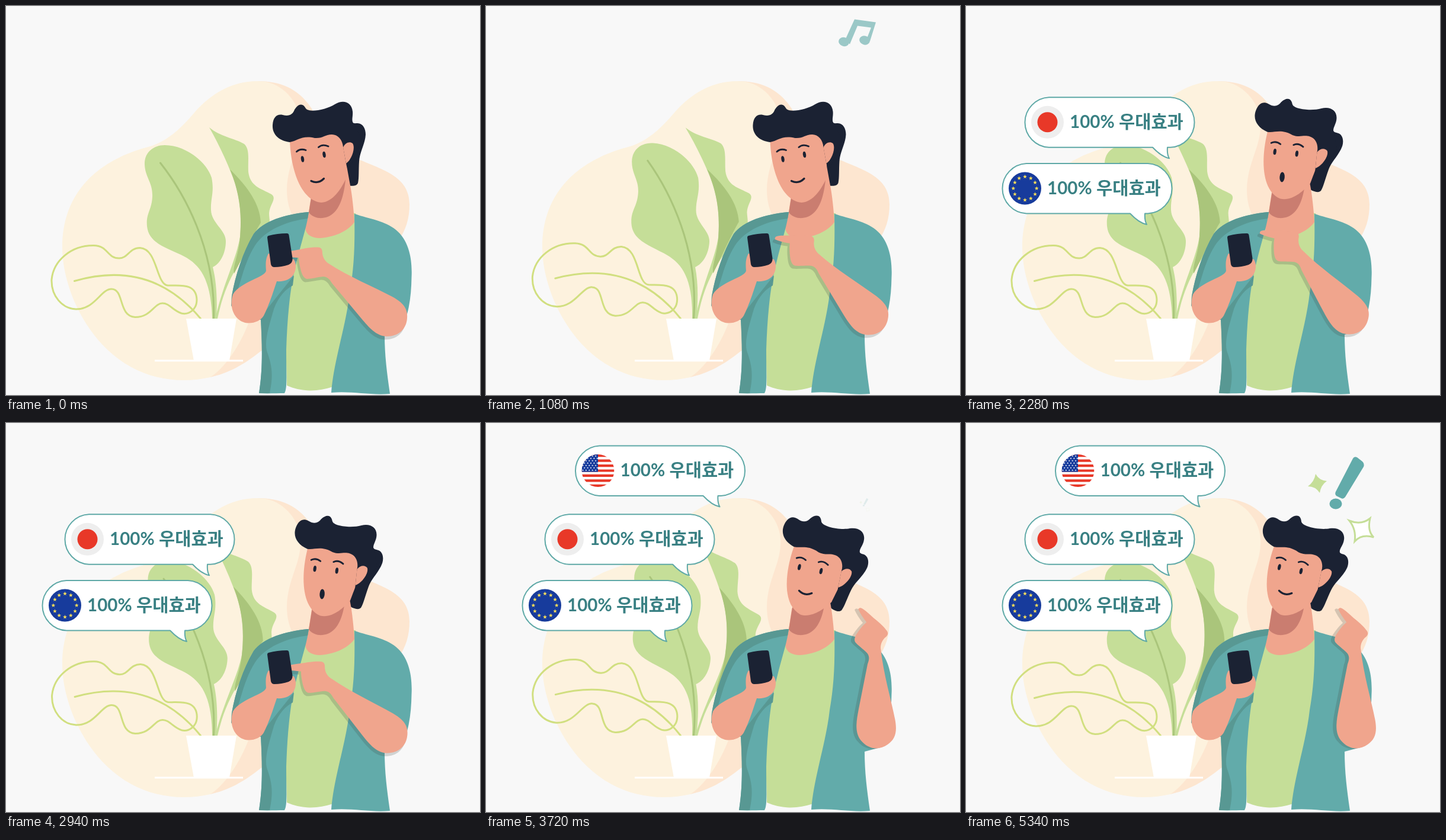
Recreate the animation shown at these times as an HTML page. Size 800 px wide and 657 px high, loop 5400 ms.

```html
<!DOCTYPE html>
<html lang="ko">
<head>
<meta charset="utf-8">
<title>우대효과</title>
<style>
  html, body { margin: 0; width: 100%; height: 100%; overflow: hidden; background: #f8f8f8; }
  svg { display: block; width: 100%; height: 100%; }
  text { font: 700 29.6px Lato, "Noto Sans CJK KR", "Noto Sans CJK JP", "Noto Sans CJK", sans-serif; fill: #398083; }
  .teal { fill: #62abaa; }
  .shade { fill: #589893; }
  .skin { fill: #f0a58d; }
  .ink { fill: #1b2233; }
  .leaf { fill: #c5de98; }
  .deep { fill: #aac57b; }
  .line { fill: none; stroke-linecap: round; stroke-linejoin: round; }
</style>
</head>
<body>
<svg viewBox="0 0 800 657">
  <defs>
    <path id="limb" d="M468 419C470 415 480 414 497 411C510 408 520 407 527 407.5C533 408 534 412 534 418C535 425 538 430 543 434C580 458 620 474 652 491C672 502 678 512 677 527C676 546 662 558 643 558C625 558 612 542 600 528L550 468C546 461 542 457 535 457C525 458 515 461 508 461C502 460 499 452 497 444C495 436 494 430 494 425C485 425 475 424 468 422Z"/>
    <clipPath id="disc"><circle cx="99.5" cy="308" r="27.5"/></clipPath>
    <g id="balloon">
      <path d="M102 266H307A42.6 42.3 0 0 1 307 350.5H302C301.5 357 302 364 305 369C295 367 285 359 277 350.5H102A42.6 42.3 0 0 1 102 266Z" fill="#fff" stroke="#5fa9a7" stroke-width="2" stroke-linejoin="round"/>
      <text x="137" y="317.5">100% 우대효과</text>
    </g>
  </defs>

  <path d="M422 127C470 126 500 145 520 180C540 225 560 247 600 261C640 278 681 290 681 335C681 385 655 410 610 450C550 505 480 550 430 583C400 607 375 620 345 627L300 500Z" fill="#fde6d0"/>
  <path d="M422 127C385 127 347 146 318 180C290 213 268 230 240 238C190 251 95 290 95 408C95 490 160 632 300 632C316 632 331 630 345 627C375 607 400 563 412 528C440 460 520 420 510 385C488 368 474 345 474 310C475 265 496 240 497 205C500 172 475 135 437 127.5Z" fill="#fdf2de"/>

  <g id="rightLeaf">
    <path class="leaf" d="M343 205C362 221 385 223 402 233C412 242 408 260 409 280C412 305 430 308 448 318C458 325 445 335 444 350C444 362 450 375 432 390C395 425 370 465 357 528H353C368 465 388 430 395 390C399 345 392 310 380 282C368 252 356 228 343 205Z"/>
    <path class="deep" d="M378 276C408 305 429 335 430 366C418 385 402 420 385 452C382 440 393 420 395 390C399 345 392 310 378 276Z"/>
  </g>
  <g id="leftLeaf">
    <path class="leaf" d="M349 441C362 435 371 417 371 397C371 378 347 367 346 345C345 325 352 315 347 290C338 262 302 235 268 235C248 235 233 248 234 268C235 290 248 298 247 322C246 345 236 350 238 372C241 400 268 407 295 420C327 435 346 460 348 528H355C357 495 355 465 349 441Z"/>
    <path class="line" d="M260.5 265C300 315 354 410 350.5 528" stroke="#aac57b" stroke-width="3"/>
  </g>
  <g id="wireLeaf" class="line" stroke="#d1df80" stroke-width="3">
    <path d="M77 462C80 430 110 404 148 404.5C173 405 170 426 191 426C206 426 208 408.5 226 408.5C256 410 253 470 273 472C290 473 321 466 322 496C322 514 307 522 296 519C281 514 276 502 264 502C250 502 245 525.5 218 525.5C189 524 200 478 178 478C160 478 150 512.5 118 512C95 511 76 490 77 462Z"/>
    <path d="M115.5 464.5C200 440 272 460 328.5 528"/>
  </g>
  <path d="M304 528H389L377 599H317Z" fill="#fff"/>
  <path d="M251 599H400" stroke="#fff" stroke-width="3"/>

  <g id="note" class="teal">
    <path d="M622 101L658 106L648 138H641L650 115L627 112L614 143L606 136Z"/>
    <ellipse cx="604" cy="139" rx="9" ry="7.5" transform="rotate(18 604 139)"/>
    <ellipse cx="639" cy="136.5" rx="9" ry="7.5" transform="rotate(18 639 136.5)"/>
  </g>
  <g id="alert">
    <path class="teal" d="M653 60Q655 56 660 58L669 65Q673 69 671 74L640 125Q637 129 633 127L625 123Q622 120 624 116Z"/>
    <ellipse class="teal" cx="624" cy="136.5" rx="10.5" ry="9"/>
    <path class="leaf" d="M590 86Q596 97 609 98Q599 105 597 118Q590 107 577 107Q588 99 590 86Z"/>
    <path d="M682 161Q677 182 688 193Q668 187 656 200Q659 180 647 165Q667 173 682 161Z" fill="#fff" stroke="#c5de98" stroke-width="3"/>
  </g>

  <g id="backHead"><path class="ink" d="M560 200L584 192C584 198 587 198.5 592 198C602 197 607 207 607 217C606 234 597 246 596 262C595 278 596 290 594 299C592 304 586 304 580 303.5C568 303 562 285 566 265Z"/></g>

  <path class="leaf" d="M511 348L590 350L600 420L568 640L552 643C525 652 500 652 474 641L470 480Z"/>
  <path class="skin" d="M516 315L511 348L505 372C505 383 511 391 529 392C552 391 577 381 588 365C587 345 584 318 581 303L575 270H530Z"/>
  <path d="M517 312L511 349C520 359 532 360 543 356C561 349 570 325 573 293Z" fill="#ca7d70"/>
  <path class="teal" d="M588 351C615 360 640 363 658 378C680 396 686 427 684.5 458C684 490 680 525 665 548L639 555C639 590 643 620 648 655C615 658 585 650 549 653C553 600 574 540 580 485C588 440 589 400 588 351Z"/>
  <path class="teal" d="M511 348C470 352 435 363 418 385C400 415 387 455 381 490C378 515 395 530 430 530C432 570 434 610 427 654C440 655 457 654 470 654C475 645 473 625 473 580C475 520 480 470 491 430C498 400 508 372 511 348Z"/>
  <path class="shade" d="M511 348C470 352 435 363 418 385C400 415 387 455 381 490L380 508C395 480 398 440 420 405C437 378 475 363 509 359Z"/>
  <path class="shade" d="M486 455L484 472C472 478 459 492 452 512C444 540 436 565 440 582C448 605 452 620 445 654H427C434 610 432 570 430 525Z"/>

  <g id="arm">
    <use href="#limb" x="-3" y="5.5" fill="#404a45" opacity=".21"/>
    <use href="#limb" class="skin"/>
  </g>
  <g id="hold">
    <path class="skin" d="M443 418C438 426 438 437 439 447C438 458 395 466 383 487C375 512 388 534 408 535.5C420 536 430 531 435 523C444 505 450 486 457 465C470 466 482 461 486 452C490 444 490 435 486 428Z"/>
    <path class="ink" d="M443 388Q458 384 474 384Q477 384 477.5 387L483.5 426Q484 434 477 437Q465 441 453 441Q448 441 447 436L441 391Q441 388.5 443 388Z"/>
    <path id="ticks" class="line" d="M442.5 360L445.5 375M427 369L438.5 379.5M419 383L435 385.5" stroke="#1b2233" stroke-width="4"/>
  </g>

  <g id="head">
    <path class="skin" d="M479 226C480 270 495 328 532 332C552 331 566 308 573 293L575 266L570 210H485Z"/>
    <path class="ink" d="M479 230C461 228 449 217 450 201C451 187 458 182 467 184C478 187 484 183 487 175C493 165 501 163 506 173C511 181 541 175 555 166C568 158 583 161 585 178C586 187 582 194 587 199L600 225L578 280L574 266L569 238C568 226 560 217 550 217C538 217 535 224 521 223C499 218 492 228 479 230Z"/>
    <path class="skin" d="M569 239C572 231 580 228 585 232C589 238 586 250 581 258C579 262 576 264 574 266Z"/>
    <g class="ink">
      <ellipse cx="500.5" cy="258.5" rx="2.6" ry="5.2" transform="rotate(-9 500.5 258.5)"/>
      <ellipse cx="537" cy="251" rx="2.6" ry="5.2" transform="rotate(-9 537 251)"/>
      <ellipse id="gasp" cx="524.5" cy="296" rx="4.2" ry="8.5" transform="rotate(-13 524.5 296)"/>
    </g>
    <g class="line" stroke="#1b2233" stroke-width="2.8">
      <path d="M490.5 246Q497 240 506 243.5M527.5 238.5Q534 232.5 544 237"/>
      <path id="smile" d="M515 295.500Q527 301 536.500 291.500" stroke-width="3.2"/>
    </g>
  </g>

  <g id="euro"><use href="#balloon"/><circle cx="99.5" cy="308" r="27.5" fill="#173b9c"/><path id="ring" fill="#f8de5a"/></g>
  <g id="sun"><use href="#balloon"/><circle cx="99.5" cy="308" r="27.5" fill="#eee"/><circle cx="99.5" cy="308" r="17" fill="#e83828"/></g>
  <g id="stripes"><use href="#balloon"/>
    <g clip-path="url(#disc)">
      <path d="M72 280.5h55v55H72Z" fill="#fff"/>
      <path id="bars" fill="#e83828"/>
      <path d="M72 280.5h27.5v29.6H72Z" fill="#173b9c"/>
      <path id="specks" fill="#fff"/>
    </g>
  </g>
</svg>
<script>
const LOOP = 5400, STEP = 60;
const el = id => document.getElementById(id);
const move = (id, v) => el(id).setAttribute('transform', v);
const fade = (id, v) => el(id).setAttribute('opacity', v);

function star(x, y, r) {
  let d = '';
  for (let i = 0; i < 10; i++) {
    const a = i * Math.PI / 5, k = i % 2 ? r * 0.42 : r;
    d += (i ? 'L' : 'M') + (x + k * Math.sin(a)).toFixed(2) + ' ' + (y - k * Math.cos(a)).toFixed(2);
  }
  return d + 'Z';
}

// Flag details
let ring = '', bars = '', specks = '';
for (let i = 0; i < 12; i++) {
  const a = i * Math.PI / 6;
  ring += star(99.5 + 19.7 * Math.sin(a), 308 - 19.7 * Math.cos(a), 3.6);
}
for (let i = 0; i < 7; i++) bars += `M72 ${280.5 + i * 8.46}h55v4.23h-55Z`;
for (let r = 0; r < 7; r++)
  for (let c = 0; c < 5; c++) specks += star(74 + c * 5.4 + (r % 2) * 2.7, 283.3 + r * 4, 1.6);
el('ring').setAttribute('d', ring);
el('bars').setAttribute('d', bars);
el('specks').setAttribute('d', specks);

// Progress from a to b: linear, eased, and there-and-back
const part = (t, a, b) => Math.min(1, Math.max(0, (t - a) / (b - a)));
const ease = (t, a, b) => { const u = part(t, a, b); return u * u * (3 - 2 * u); };
const swing = (t, a, b) => Math.sin(Math.PI * part(t, a, b)) ** 2;

// Each bubble pops up as he reacts
const SECOND = 1860, THIRD = 3060, RAISE = 3260, SMILE = 3600;

function pop(id, t, start, x, y) {
  const s = 1.2 * part(t, start, start + 180) - 0.2 * part(t, start + 180, start + 390);
  move(id, `translate(${x + 341.5} ${y + 379.5}) scale(${s}) translate(-341.5 -379.5)`);
  fade(id, s > 0 ? 1 : 0);
}

function plant(t) {
  const left = 2.7 * swing(t, 0, 2340) + 3.6 * swing(t, 2340, LOOP);
  const right = -1.4 * ease(t, 0, 1500) + 6.4 * ease(t, 1500, 4700) - 2.8 * ease(t, 4700, LOOP);
  move('leftLeaf', `rotate(${left} 350 528)`);
  move('wireLeaf', `rotate(${left * 0.45} 328 528)`);
  move('rightLeaf', `rotate(${right} 354 528)`);
}

function man(t) {
  const nod = 11 * ease(t, 1080, 1440) + 5.5 * ease(t, SECOND, SECOND + 360) + 5.5 * ease(t, THIRD, THIRD + 240);
  const pose = `translate(${2.6 * swing(t, 0, 1260)} 0) rotate(${nod} 553.4 323.8)`;
  move('head', pose);
  move('backHead', pose);

  const reach = 9 * ease(t, 0, 1200) + 3 * ease(t, SECOND, SECOND + 360) - 11 * ease(t, 2400, THIRD);
  const raise = ease(t, RAISE, RAISE + 460);
  move('arm', `translate(${20 * raise + 0.3 * reach} ${-10 * raise - 0.35 * reach}) rotate(${reach + 50 * raise} 640 520)`);
  move('hold', `rotate(${ease(t, 720, 1080) - ease(t, 300, 600)} 410 505)`);
  fade('ticks', t >= 540 && t < 840 ? 1 : 0);

  const gasp = t >= SECOND && t < SMILE;
  fade('gasp', gasp ? 1 : 0);
  fade('smile', gasp ? 0 : 1);
}

function draw(t) {
  plant(t);
  man(t);

  move('note', `translate(0 ${(660 - t) * 0.187})`);
  fade('note', 0.95 * (ease(t, 240, 480) - ease(t, 960, 1260)));
  const grow = ease(t, 3660, 3900);
  move('alert', `translate(640 140) scale(${grow}) translate(-640 -140)`);
  fade('alert', grow);

  pop('euro', t, 1110, 0, 0);
  pop('sun', t, SECOND, 38, -111.7);
  pop('stripes', t, THIRD, 89.5, -227.5);
}

const begin = performance.now();
function tick() {
  const t = (performance.now() - begin) % LOOP;
  draw(Math.floor(t / STEP) * STEP);
  requestAnimationFrame(tick);
}
draw(0);
tick();
</script>
</body>
</html>
```
